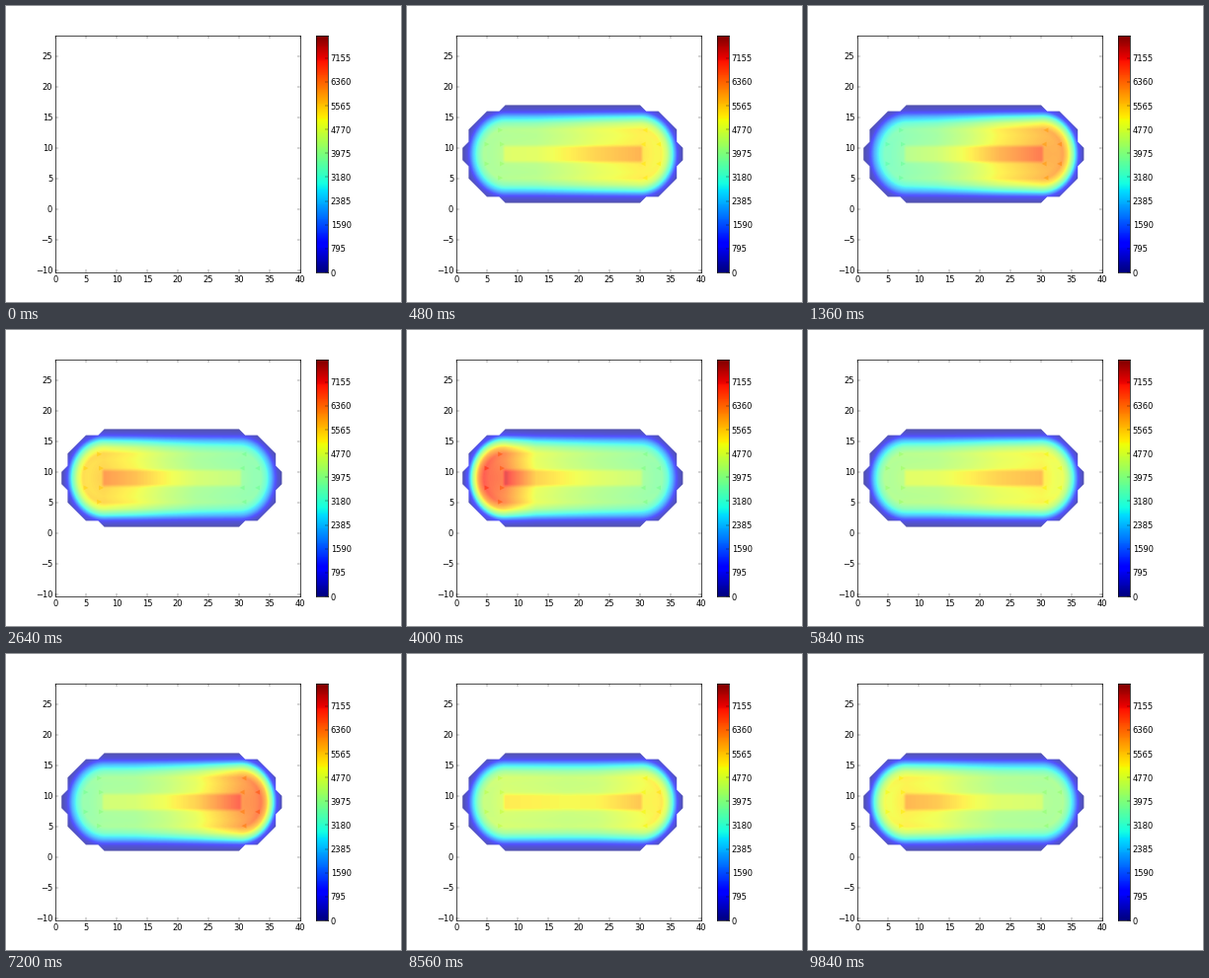
Write a matplotlib script that moves like this. It is 400x300 px and loops after 9920 ms.

```python
import numpy as np
import matplotlib.pyplot as plt
from matplotlib.animation import FuncAnimation
from matplotlib.patches import Polygon

plt.rcParams.update({"font.family": "DejaVu Sans", "font.size": 12,
                     "axes.linewidth": 1.0})

FRAMES, STEP = 124, 80
VMAX = 7905
ALPHA = 0.68
CX, CY = 19, 9            # centre of the vessel
LEFT, RIGHT = 8, 30       # ends of the straight part

# Level along the vessel at chosen times (ms)
NODES = [4, 8, 13, 18, 23, 30, 34]
TIMES = [80, 1360, 2640, 4000, 5840, 7200, 9840]
LEVELS = np.array([
    [4300, 4400, 4400, 4650, 4900, 5150, 4900],
    [3500, 3800, 4050, 4600, 5300, 5950, 6250],
    [5500, 5600, 5200, 4600, 4150, 3900, 3750],
    [7200, 6500, 5000, 4600, 4300, 4000, 3800],
    [4200, 4300, 4350, 4650, 5000, 5250, 5000],
    [3800, 4100, 4150, 4500, 5000, 6200, 6800],
    [5100, 5300, 5100, 4600, 4250, 4150, 4200],
])
# Relative level against distance from the axis
PROFILE = [1, 1, 0.985, 0.975, 0.99, 0.85, 0.56, 0.14, 0]

fig = plt.figure(figsize=(8, 6), dpi=50, facecolor="white")
ax = fig.add_axes([0.125, 0.1, 0.62, 0.8])
bar = fig.add_axes([0.785, 0.1, 0.03, 0.8])

half = 40 * 240 / 248 / 2
ax.set_xlim(0, 40)
ax.set_ylim(CY - half, CY + half)
ax.set_xticks(range(0, 41, 5))
ax.set_yticks(range(-10, 26, 5))
ax.tick_params(direction="in", length=4, width=0.5, pad=4,
               top=True, right=True)

ramp = np.linspace(0, 1, 512)[:, None]
bar.imshow(ramp, cmap="jet", origin="lower", aspect="auto",
           extent=(0, 1, 0, VMAX))
bar.set_xticks([])
bar.set_yticks(range(0, VMAX, 795))
bar.yaxis.tick_right()
bar.tick_params(direction="in", length=4, width=0.5, pad=4)

# One quarter of the outline, mirrored to the rest
quarter = np.array([(30, 17), (31, 16), (33, 16), (36, 13), (36, 11), (37, 10)])
lower = quarter[::-1] * [1, -1] + [0, 2 * CY]
right = np.vstack([quarter, lower])
outline = np.vstack([right, right[::-1] * [-1, 1] + [2 * CX, 0]])
vessel = Polygon(outline, closed=True, transform=ax.transData)

# Sample points and the parts of the field that do not change
xs = 1 + (np.arange(36 * 8) + 0.5) / 8
ys = 1 + (np.arange(16 * 8) + 0.5) / 8
X, Y = np.meshgrid(xs, ys)
past_end = np.maximum(np.maximum(LEFT - X, X - RIGHT), 0)
shape = np.interp(np.hypot(past_end * 8 / 7, Y - CY), range(9), PROFILE)
core = (np.clip((1.6 - abs(Y - CY)) / 0.6, 0, 1)
        * np.clip(1 - past_end / 0.5, 0, 1))
shape = shape * (1 + 0.12 * core)

heat = ax.imshow(np.zeros_like(X), cmap="jet", vmin=0, vmax=VMAX,
                 extent=(1, 37, 1, 17), origin="lower", aspect="auto",
                 interpolation="bilinear", alpha=ALPHA, zorder=1)
ax.set_xlim(0, 40)
ax.set_ylim(CY - half, CY + half)
heat.set_clip_path(vessel)

# Small darker facets in both end caps
spots = [(5, 1.6), (7.5, 1.6), (7.2, 3.9)]
facets = []
for x, dy in spots:
    for side in (1, -1):
        for sign in (1, -1):
            px = x if side == 1 else 2 * CX - x
            py = CY + sign * dy
            tri = [(px - 0.4 * side, py + 0.4), (px - 0.4 * side, py - 0.4),
                   (px + 0.4 * side, py)]
            patch = ax.add_patch(Polygon(tri, lw=0, alpha=0.5, zorder=2))
            facets.append((patch, px, py))


def level_at(t):
    """Level along the vessel, eased between the chosen times."""
    i = int(np.clip(np.searchsorted(TIMES, t, side="right") - 1,
                    0, len(TIMES) - 2))
    u = np.clip((t - TIMES[i]) / (TIMES[i + 1] - TIMES[i]), 0, 1)
    u = u * u * (3 - 2 * u)
    return LEVELS[i] * (1 - u) + LEVELS[i + 1] * u


def update(frame):
    shown = frame > 0
    heat.set_visible(shown)
    field = np.interp(xs, NODES, level_at(frame * STEP)) * shape
    heat.set_data(field)
    for patch, px, py in facets:
        value = field[int((py - 1) * 8), int((px - 1) * 8)]
        patch.set_facecolor(plt.cm.jet(value / VMAX))
        patch.set_visible(shown)
    return [heat] + [f[0] for f in facets]


anim = FuncAnimation(fig, update, frames=FRAMES, interval=STEP,
                     repeat=True, repeat_delay=0, blit=False)
plt.show()
```
